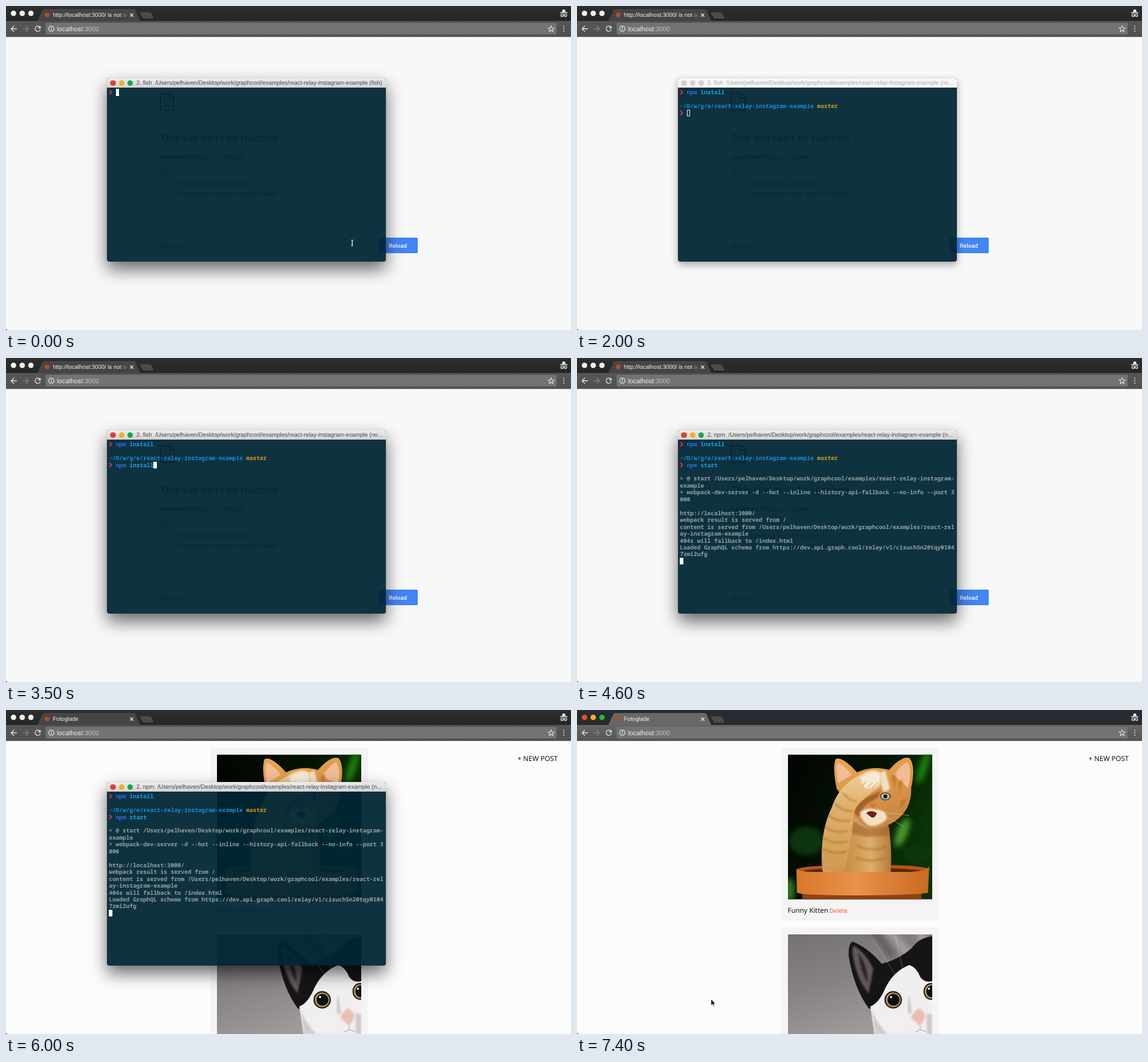
These frames come from a looping animation (940 px wide and 540 px high, 7.5 s). An HTML page:

```html
<!DOCTYPE html>
<html lang="en">
<head>
<meta charset="utf-8">
<title>Terminal demo</title>
<style>
html, body { margin: 0; width: 940px; height: 540px; overflow: hidden; background: #f8f8f8; }
body { position: relative; font-family: "Liberation Sans", Arial, sans-serif; text-rendering: geometricPrecision; }
svg { position: absolute; left: 0; top: 0; width: 940px; height: 540px; }
[hidden] { display: none; }

.bar { fill: url(#barBack); }
.tool { fill: url(#toolBack); }
.tab { fill: #454545; }
.front .bar { fill: #282c30; }
.front .tool { fill: url(#toolFront); }
.front .tab { fill: #676767; }
.lights circle { fill: #f0f0f0; }
.front .lights circle:nth-child(1) { fill: #ee4b35; }
.front .lights circle:nth-child(2) { fill: #f5b322; }
.front .lights circle:nth-child(3) { fill: #27b83f; }
.line { fill: none; stroke: #e4e4e4; stroke-width: 1.3; }
.sans { font-family: "Open Sans", "Noto Sans", sans-serif; font-size: 11.5px; }
.small { font-size: 10.7px; fill: #505050; }

#term {
  position: absolute; left: 168px; top: 120px; width: 464px; height: 306px;
  border-radius: 4px; background: rgba(0, 38, 53, .94);
  box-shadow: 0 0 1px rgba(0, 0, 0, .5), 0 13px 28px rgba(0, 0, 0, .58);
}
#term.idle { box-shadow: 0 0 1px rgba(0, 0, 0, .4), 0 5px 13px rgba(0, 0, 0, .34); }
#head {
  position: relative; height: 16px; border-radius: 4px 4px 0 0;
  background: linear-gradient(#ececec, #d3d3d3); color: #494949;
  font-size: 9.66px; line-height: 17px; white-space: pre;
}
#head i { position: absolute; top: 3.5px; width: 9.4px; height: 9.4px; border-radius: 50%; }
#title { position: absolute; left: 49px; top: 0; }
.idle #head { background: #f5f5f5; color: #a9a9a9; }
.idle #head i { background: #d2d2d2 !important; }
#rows {
  position: absolute; left: 3.2px; top: 18.2px; color: #93a1a1;
  font: 600 9.53px/11.46px "Noto Sans Mono", "DejaVu Sans Mono", monospace;
}
#rows div { height: 11.46px; white-space: pre; }
#rows b { font-weight: 700; }
#rows i { display: inline-block; width: 5.72px; vertical-align: top; }
.mark { height: 8px; margin-top: 1.6px; clip-path: polygon(0 0, 40% 0, 95% 50%, 40% 100%, 0 100%, 45% 50%); }
.caret { height: 11.46px; background: #fff; }
.idle .caret { background: none; box-shadow: inset 0 0 0 1px #e8eeee; }
</style>
</head>
<body>
<svg viewBox="0 0 940 540">
  <defs>
    <linearGradient id="barBack" x2="0" y2="1"><stop stop-color="#2e2e2e"/><stop offset="1" stop-color="#262626"/></linearGradient>
    <linearGradient id="toolBack" x2="0" y2="1"><stop stop-color="#565656"/><stop offset="1" stop-color="#515151"/></linearGradient>
    <linearGradient id="toolFront" x2="0" y2="1"><stop stop-color="#676767"/><stop offset="1" stop-color="#555"/></linearGradient>
    <linearGradient id="fade" gradientUnits="userSpaceOnUse" x1="188" x2="204"><stop stop-color="#f2f2f2"/><stop offset="1" stop-color="#f2f2f2" stop-opacity="0"/></linearGradient>
    <linearGradient id="leaves" x2="1" y2=".4"><stop stop-color="#020402"/><stop offset=".6" stop-color="#041404"/><stop offset="1" stop-color="#0b3407"/></linearGradient>
    <linearGradient id="body" x2="1"><stop stop-color="#d8a45c"/><stop offset=".35" stop-color="#c98d45"/><stop offset=".7" stop-color="#dcae6c"/><stop offset="1" stop-color="#b87a38"/></linearGradient>
    <linearGradient id="arm" x2="0" y2="1"><stop stop-color="#eed3a4"/><stop offset=".35" stop-color="#e0b06a"/><stop offset="1" stop-color="#cf9a52"/></linearGradient>
    <linearGradient id="face" x2=".3" y2="1"><stop stop-color="#e9a654"/><stop offset=".5" stop-color="#dd9747"/><stop offset="1" stop-color="#c98742"/></linearGradient>
    <linearGradient id="pot" x2="1"><stop stop-color="#d9782c"/><stop offset=".45" stop-color="#e8924a"/><stop offset="1" stop-color="#c96a20"/></linearGradient>
    <linearGradient id="wall" x2=".45" y2="1"><stop stop-color="#757174"/><stop offset=".5" stop-color="#868183"/><stop offset="1" stop-color="#a09a99"/></linearGradient>
    <filter id="soft" x="-50%" y="-50%" width="200%" height="200%"><feGaussianBlur stdDeviation="5"/></filter>
    <filter id="blend" x="-30%" y="-30%" width="160%" height="160%"><feGaussianBlur stdDeviation="1.500"/></filter>
    <clipPath id="photo1"><path d="M351 74.500h240v241h-240z"/></clipPath>
    <clipPath id="photo2"><path d="M351 374h240v240h-240z"/></clipPath>
  </defs>

  <g id="error">
    <path fill="#f8f8f8" d="M0 51h940v489H0z"/>
    <g fill="none" stroke="#444" stroke-width="2">
      <path d="M257 146h16l6.500 6.500V174H257zM272 146v7.500h7"/>
      <path d="M263 168q5-6 10 0M263 156v3M273 158v2"/>
    </g>
    <text x="256" y="225.500" font-size="17.3" fill="#2a2a2a">This site can’t be reached</text>
    <g class="small">
      <text x="256" y="254.500"><tspan font-weight="700">localhost</tspan> refused to connect.</text>
      <text x="256" y="282">Try:</text>
      <text x="285" y="299.500">Checking the connection</text>
      <text x="285" y="316.500">Checking the proxy and the firewall</text>
      <circle cx="276" cy="296" r="1.600"/><circle cx="276" cy="313" r="1.600"/>
      <text x="256" y="343.500" style="font-size:8.2px;fill:#999">ERR_CONNECTION_REFUSED</text>
      <text x="256" y="402.500" style="font-size:9.1px">DETAILS</text>
    </g>
    <rect x="620" y="386" width="65" height="26" rx="1.500" fill="#4285f4"/>
    <text x="637" y="402.500" font-family="Roboto, sans-serif" font-size="9.7" font-weight="500" fill="#fff">Reload</text>
  </g>

  <g id="feed">
    <path fill="#fcfcfc" d="M0 51h940v489H0z"/>
    <path fill="#f4f4f4" d="M340 63h262v288H340zM340 363h262v177H340z"/>
    <g clip-path="url(#photo1)">
      <path fill="url(#leaves)" d="M351 74h240v242H351z"/>
      <g filter="url(#soft)">
        <ellipse cx="576" cy="96" rx="7" ry="28" fill="#1c8010" transform="rotate(18 576 96)"/>
        <ellipse cx="541" cy="204" rx="9" ry="25" fill="#47982a" transform="rotate(22 541 204)"/>
        <ellipse cx="382" cy="218" rx="30" ry="24" fill="#0d3509"/>
        <ellipse cx="354" cy="300" rx="8" ry="20" fill="#35781d"/>
        <ellipse cx="566" cy="240" rx="24" ry="14" fill="#0f360a"/>
      </g>
      <path fill="#b85618" d="M366 266q1-7 109-8 109 0 110 8v10H366z"/>
      <path fill="#5e270a" d="M378 267q90-9 194 0v7H378z"/>

      <path fill="url(#body)" d="M409 270Q406 200 440 170H505Q519 186 520 205 524 235 522 270z"/>
      <path fill="#a0602a" opacity=".6" filter="url(#blend)" d="M460 184Q480 205 519 192L520 208Q485 216 456 205z"/>
      <path fill="url(#face)" d="M432 131Q425 98 430 82 441 76 466 104 492 92 519 100 540 76 553 80 564 92 556 130 557 165 531 184 508 200 485 196 466 188 457 165z"/>
      <path fill="#f0bd95" d="M434 122Q430 96 434 88 443 90 457 108zM527 108Q543 88 550 87 558 100 551 130z"/>
      <g filter="url(#blend)">
        <path fill="#8f5223" opacity=".75" d="M460 170Q466 153 490 142L506 134 500 146 480 158 468 178z"/>
        <path fill="#f2e0c6" d="M471 170Q484 161 499 166 517 168 515 182 503 195 487 193 473 187 471 170zM500 106L513 101 521 132 510 137z"/>
        <path fill="#b06c2c" opacity=".6" d="M523 112l8-6-2 26zM535 120l8-4-8 28zM540 150l10-2-14 20z"/>
      </g>
      <path fill="url(#arm)" d="M408 267Q403 205 424 162 435 128 466 111 492 94 504 104 511 116 503 129 488 138 478 148 461 160 460 178 457 215 446 267z"/>
      <g filter="url(#blend)" fill="none" stroke="#a9692c" opacity=".55">
        <path stroke-width="3" d="M413 195q17 12 37 6M409 213q18 12 41 6M409 231q18 11 39 5M418 176q18 12 37 8M429 156q14 14 30 12M443 138q10 14 22 14"/>
        <path stroke-width="3" d="M466 226q24 12 48 2M464 246q26 10 50 0"/>
      </g>
      <path fill="#f6ead4" filter="url(#blend)" d="M471 112Q492 98 503 106 508 117 500 126 487 132 478 130z"/>
      <path fill="none" stroke="#b98d55" d="M484 128l8-7M491 130l9-9M476 126l5-7"/>
      <ellipse cx="513" cy="144" rx="9" ry="6.500" fill="#4c2c16"/>
      <ellipse cx="513" cy="144" rx="7.500" ry="5.300" fill="#a9b9b8"/><circle cx="513" cy="144" r="3.200" fill="#14191c"/>
      <path fill="#df6a4a" d="M486 157l12-2-4 9z"/>
      <path fill="#672317" d="M481 172q8-7 18 0-4 9-9 7z"/>
      <path fill="none" stroke="#fff3dc" stroke-width=".6" opacity=".7" d="M507 170l46 6M506 174l38 20M476 175l-24 17"/>

      <path fill="#8f4314" d="M375 300h198v16H375z"/>
      <path fill="url(#pot)" d="M365 264Q367 270 400 270H550Q580 269 586 261L584 304Q580 308 475 309 368 309 366 304z"/>
    </g>
    <text class="sans" x="350.500" y="337.500">Funny Kitten</text>
    <text class="sans" x="420" y="337.500" style="font-size:10px" fill="#f0501f">Delete</text>
    <text class="sans" x="851" y="85">+ NEW POST</text>
    <g clip-path="url(#photo2)">
      <path fill="url(#wall)" d="M351 374h240v166H351z"/>
      <g filter="url(#soft)" fill="none" stroke-width="12">
        <path stroke="#605c60" d="M490 362l36 50"/>
        <path stroke="#a8a19e" d="M515 362l40 50M568 362l14 40"/>
      </g>
      <path fill="#171416" d="M452 410Q451 389 459 386 485 397 507 423 535 416 557 397 568 380 591 377V460H540L502 495 486 498Q461 465 452 410z"/>
      <path fill="#62575a" filter="url(#blend)" d="M459 410Q457 395 461 393 482 407 493 432L485 472Q466 450 459 410z"/>
      <path fill="#2c2426" filter="url(#blend)" d="M468 405q15 19 16 50-13-20-16-50z"/>
      <path fill="#f0eeee" d="M495 540L488 494Q500 490 510 470 524 436 553 425 565 429 571 445 578 455 591 452V540z"/>
      <path fill="#cfc9c9" filter="url(#blend)" d="M490 496q6 24 26 44h-20zM553 474q-5 18-1 34l5-4zM582 505v35h9v-32z"/>
      <circle cx="526" cy="483" r="14.500" fill="#211a16"/>
      <circle cx="526" cy="483" r="12.300" fill="#b8945f"/><circle cx="526.500" cy="483" r="10" fill="#0c1013"/>
      <ellipse cx="589" cy="469" rx="12.500" ry="14" fill="#211a16"/>
      <ellipse cx="589" cy="469" rx="10.500" ry="12" fill="#b8945f"/><ellipse cx="590" cy="469" rx="8.800" ry="10" fill="#0c1013"/>
      <path fill="#fff" d="M521 477h3v3h-3zM584 463h3v3h-3z"/>
      <path fill="#ecbdb5" filter="url(#blend)" d="M556 513Q560 502 570 497 578 503 580 511L571 527z"/>
      <path fill="none" stroke="#c09594" d="M571 527v6l-9 4M571 533l10 3"/>
      <path fill="none" stroke="#fff" stroke-width=".6" opacity=".45" d="M548 521l-62-6M548 527l-60 10M535 450l-42-67M545 446l-15-70"/>
    </g>
  </g>

  <path class="bar" d="M0 0h940v26H0z"/>
  <path class="tool" d="M0 25h940v26H0z"/>
  <path fill="#3f3f3f" d="M0 50.500h940v1H0z"/>
  <path class="tab" d="M52 25.500L60 8Q61.500 5 64.500 5H211Q214.500 5 216 8L223.500 25.500z"/>
  <path fill="#4b4b4b" d="M224 10.500h15q2 0 3 2l3 6.500q1 2-1 2H230q-2 0-3-2l-4-7q-1-1.500 1-1.500z"/>
  <g class="lights"><circle cx="12.500" cy="12.200" r="4.500"/><circle cx="27" cy="12.200" r="4.500"/><circle cx="41.500" cy="12.200" r="4.500"/></g>
  <circle cx="68.500" cy="15" r="4" fill="#b84a20"/>
  <text id="tabText" x="78" y="18.200" font-size="9.6" fill="url(#fade)"></text>
  <path class="line" d="M206.500 12.500l5.200 5.200m0-5.200l-5.200 5.200"/>
  <g fill="#f0f0f0">
    <path d="M924.800 10l1.400-4q1.800-.6 3.600 0l1.400 4zM922 10.600h12v1.400h-12z"/>
    <g class="line"><circle cx="925.200" cy="15.600" r="2"/><circle cx="930.800" cy="15.600" r="2"/><path d="M927 15h2"/></g>
  </g>
  <path class="line" d="M18 38H8.500m4.700-4.700L8.500 38l4.700 4.700"/>
  <path class="line" style="stroke:#818181" d="M28 38h9.500m-4.700-4.700L37.500 38l-4.700 4.700"/>
  <path class="line" d="M56.500 35.300a4.400 4.400 0 1 0 .6 4"/>
  <path fill="#e4e4e4" d="M57.700 33v4.500h-4.500z"/>
  <rect x="66" y="28" width="850" height="19.500" rx="2" fill="#737373"/>
  <circle class="line" cx="75.500" cy="38" r="4.400"/>
  <path class="line" d="M75.500 37.300v3.300M75.500 35v1.300"/>
  <text x="84.800" y="41.500" font-size="10.86" fill="#f4f4f4">localhost<tspan fill="#c0c0c0">:3000</tspan></text>
  <path class="line" style="stroke-width:1.100" d="M907 33.300l1.400 3.200 3.500.3-2.700 2.300.8 3.400-3-1.800-3 1.800.8-3.400-2.700-2.300 3.500-.3z"/>
  <g fill="#d4d4d4"><circle cx="928" cy="34" r="1.100"/><circle cx="928" cy="38" r="1.100"/><circle cx="928" cy="42" r="1.100"/></g>
  <path fill="#111" d="M0 538v2h2z"/>
</svg>

<div id="term">
  <div id="head"><i style="left:5.2px;background:#d94436"></i><i style="left:19.5px;background:#efaf20"></i><i style="left:33.8px;background:#18a748"></i><span id="title"></span></div>
  <div id="rows"></div>
</div>

<svg viewBox="0 0 940 540">
  <path id="beam" fill="none" stroke="#e8eef0" d="M-2-5q2 0 2 1.500v7q0 1.500-2 1.500M2-5q-2 0-2 1.500v7q0 1.500 2 1.500"/>
  <path id="arrow" fill="#000" stroke="#fff" stroke-width=".8" d="M0 0v10.500l2.400-2.200 1.600 3.800 1.700-.7-1.600-3.700h3.400z"/>
</svg>

<script>
const LOOP = 7500, LOADED = 4700, FRONT = 7200;
const $ = id => document.getElementById(id);
const bold = (color, text) => `<b style="color:${color}">${text}</b>`;
const mark = color => `<i class="mark" style="background:${color}"></i> `;
const caret = '<i class="caret"></i>';
const home = '/Users/pelhaven/Desktop/work/graphcool/examples/react-';

const command = text => bold('#246fe0', text.slice(0, 3)) + bold('#16a0ee', text.slice(3));
const prompt1 = mark('#e0301e'), prompt2 = mark('#d62f5b');
const folder = bold('#1b8bd6', '~/D/w/g/e/react-relay-instagram-example') + ' ' + bold('#cf9a22', 'master');

// [time, lines printed then]
const output = [
  [4250, ['', `&gt; @ start ${home}relay-instagram-`, 'example',
    '&gt; webpack-dev-server -d --hot --inline --history-api-fallback --no-info --port 3', '000', '']],
  [4450, ['http://localhost:3000/', 'webpack result is served from /',
    `content is served from ${home}rel`, 'ay-instagram-example', '404s will fallback to /index.html']],
  [4600, ['Loaded GraphQL schema from https://dev.api.graph.cool/relay/v1/cisuch5n20tqy0104', '7zmi2ufg']]
];

const typed = (text, t, start, step) => text.slice(0, Math.max(0, Math.floor((t - start) / step)));

function secondCommand(t) {
  if (t < 3200) return '';
  if (t < 3600) return 'npm install';
  if (t < 3800) return 'npm install'.slice(0, 11 - Math.floor((t - 3600) / 28));
  return 'npm ' + typed('start', t, 3800, 50);
}

function screen(t) {
  if (t < 1500) return [prompt1 + command(typed('npm install', t, 300, 60)) + caret];
  const lines = [prompt1 + command('npm install'), ''];
  if (t < 1900) return [lines[0], caret];
  lines.push(folder);
  const line = prompt2 + command(secondCommand(t));
  if (t < 4150) return [...lines, line + caret];
  lines.push(line);
  for (const [at, text] of output) if (t >= at) lines.push(...text);
  return [...lines, caret];
}

function windowTitle(t) {
  const [name, end] = t < 1500 ? ['fish', '(fish)'] : t < 4150 ? ['fish', '(no...'] : ['npm', '(n...'];
  return `2. ${name}  ${home}relay-instagram-example ${end}`;
}

function pointer(t) {
  const p = Math.min(1, Math.max(0, (t - 6500) / 400));
  const k = p * p * (3 - 2 * p);
  const x = 576 - 353 * k, y = 395 + 87 * k;
  const seen = t < 300 || t >= 6500, inside = y < 426;
  $('beam').style.display = seen && inside ? '' : 'none';
  $('arrow').style.display = seen && !inside ? '' : 'none';
  for (const id of ['beam', 'arrow']) $(id).setAttribute('transform', `translate(${x} ${y})`);
}

const last = {};
function update(id, html) {
  if (last[id] !== html) $(id).innerHTML = last[id] = html;
}

function draw(t) {
  const loaded = t >= LOADED;
  $('error').style.display = loaded ? 'none' : '';
  $('feed').style.display = loaded ? '' : 'none';
  update('tabText', loaded ? 'Fotoglade' : 'http://localhost:3000/ is not av');
  update('title', windowTitle(t));
  update('rows', screen(t).map(line => `<div>${line}</div>`).join(''));
  $('term').hidden = t >= FRONT;
  $('term').classList.toggle('idle', t >= 1900 && t < 2900);
  document.body.classList.toggle('front', t >= FRONT);
  pointer(t);
}

const start = performance.now();
function tick() {
  draw((performance.now() - start) % LOOP);
  requestAnimationFrame(tick);
}
tick();
</script>
</body>
</html>
```
